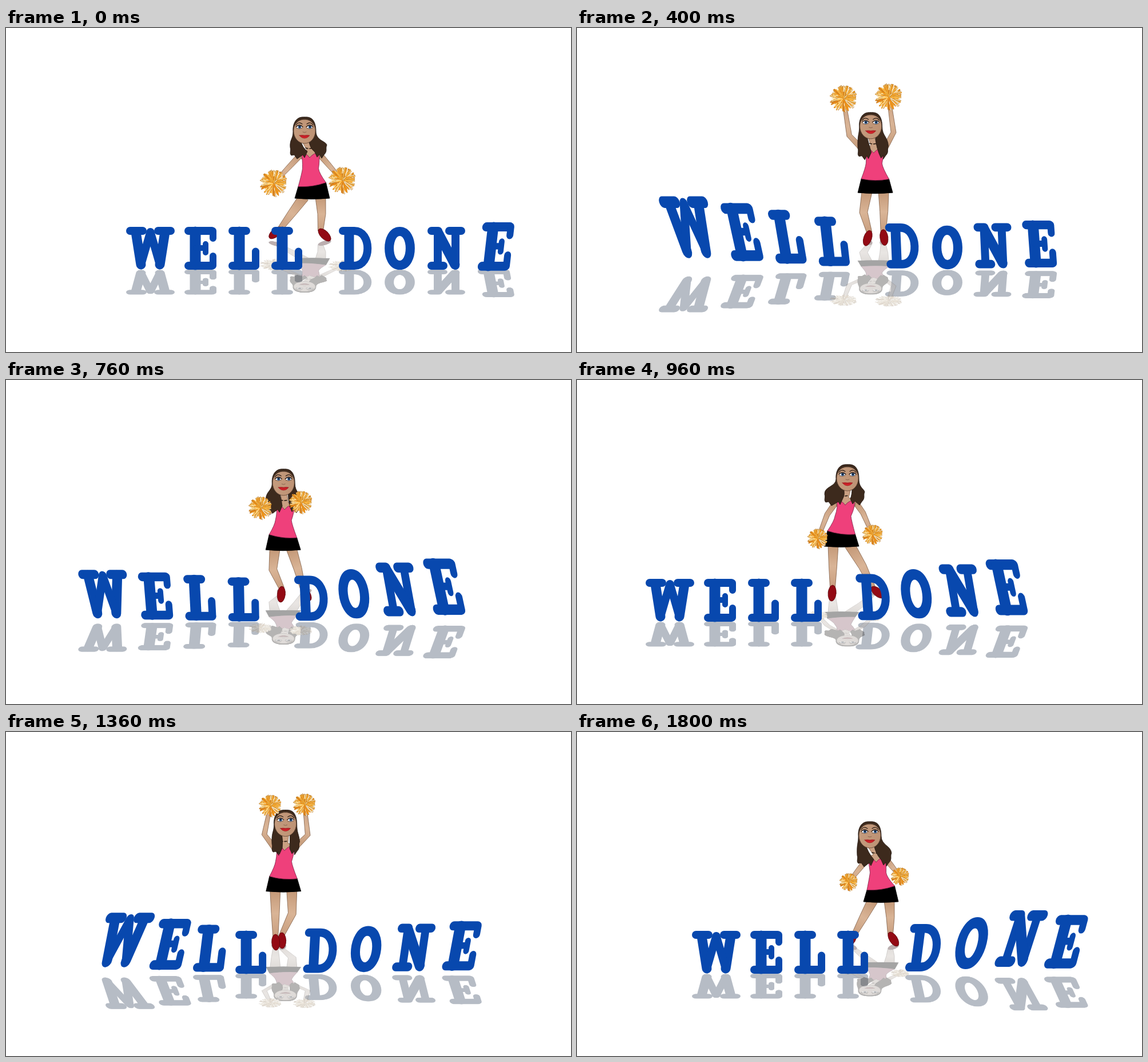
Animation, 988 px wide and 567 px high, one loop 1840 ms. Source, as an HTML page with a canvas:

```html
<!DOCTYPE html>
<html lang="en">
<head>
<meta charset="utf-8">
<title>Well done</title>
<style>
html, body { margin: 0; width: 100%; height: 100%; overflow: hidden; background: #fff; }
canvas { display: block; width: 100%; height: 100%; }
</style>
</head>
<body>
<canvas role="img" aria-label="WELL DONE"></canvas>
<script>
const W = 988, H = 567, STEP = 40, LOOP = 1840;
const BLUE = '#0848ae', INK = '#2a1c14', HAIR = '#3d2a1d';
const scale = window.devicePixelRatio || 1;

function setup(canvas) {
  canvas.width = W * scale;
  canvas.height = H * scale;
  return canvas.getContext('2d');
}
const stage = setup(document.querySelector('canvas'));
const dancerLayer = setup(document.createElement('canvas'));
const wordLayer = setup(document.createElement('canvas'));

// Each row starts with its step number.
// word: offset, calm letter, growth to the left, growth to the right, lean, pivot y
const WORD = [
  [0, 0, 6, 0, .13, 75, 409],
  [4, -22, 5, .1, 0, -50, 461],
  [13, -61, 4, .072, .105, -55, 461],
  [22, -90, 3, 0, .075, -70, 461],
  [24, -90, 3, .025, .05, 0, 461],
  [28, -81, 3, .083, 0, 100, 461],
  [36, -43, 3, .083, .083, 100, 461],
  [43, -9, 3, 0, .106, 100, 461]
];
// body: head x y, shoulder shift, hem x y, hem tilt, hair left, right, bottom
const BODY = [
  [0, 522, 181, 10, 535, 274, -7, -26, 39, 46],
  [4, 524, 166, 5, 531, 258, -3, -25, 31, 54],
  [13, 498, 183, 7, 505, 274, 4, -24, 32, 55],
  [22, 473, 173, -3, 462, 267, 6, -41, 30, 45],
  [28, 480, 158, -1, 477, 251, 3, -27, 26, 50],
  [36, 498, 169, 1, 495, 262, 4, -24, 26, 54],
  [43, 512, 182, 12, 531, 273, -7, -23, 38, 52]
];
// legs: left ankle x y, bend, shoe angle, then the same for the right
const LEGS = [
  [0, 479, 352, 0, -50, 550, 355, 2, 45],
  [4, 503, 353, -1, -30, 548, 352, 1, 10],
  [13, 509, 364, -15, -8, 521, 363, 1, 15],
  [22, 447, 363, 0, -5, 518, 365, 2, 50],
  [28, 463, 352, -1, 0, 494, 348, 9, 28],
  [36, 478, 364, 1, 0, 483, 363, 8, -15],
  [43, 485, 354, 0, -30, 548, 354, 1, 32]
];
// arms: left pompom x y, bend, right pompom x y, bend, pompom radius
const ARMS = [
  [0, 468, 272, 0, 588, 267, 0, 23],
  [4, 484, 226, 0, 572, 221, 0, 24],
  [8, 466, 124, 14, 545, 121, -14, 23],
  [13, 466, 165, 18, 518, 154, -15, 22],
  [22, 421, 278, -4, 517, 271, 3, 17],
  [28, 443, 187, 10, 514, 179, -28, 19],
  [31, 458, 133, 15, 523, 130, -18, 19],
  [36, 475, 147, 15, 517, 146, -16, 18],
  [43, 475, 263, 0, 565, 253, 0, 15]
];

// Smooth curve through the rows of a table
function sample(rows, n) {
  const last = rows.length - 1;
  let i = 0;
  while (i < last - 1 && rows[i + 1][0] <= n) i++;
  const a = rows[i], b = rows[i + 1];
  const before = rows[Math.max(0, i - 1)], after = rows[Math.min(last, i + 2)];
  const span = b[0] - a[0], u = (n - a[0]) / span;
  return a.slice(1).map((v, j) => {
    const c = j + 1;
    const ta = (b[c] - before[c]) / (b[0] - before[0]) * span;
    const tb = (after[c] - a[c]) / (after[0] - a[0]) * span;
    const d = b[c] - v;
    return v + u * (ta + u * (3 * d - 2 * ta - tb + u * (ta + tb - 2 * d)));
  });
}

// Letter strokes on a 75 high box: [width, path]
const E = [[14, 'M7 7H48M7 68H48'], [12, 'M50 7V20M50 68V51'], [19, 'M19 9V66'], [10, 'M20 37H36M37 30V45']];
const L = [[14, 'M7 7H31M7 68H47'], [13, 'M47.5 68V43'], [19, 'M19 9V66']];
const GLYPHS = {
  E, L,
  W: [[14, 'M7 7H29M56 7H78'], [17, 'M17 9L26 66M68 9L59 66'], [14, 'M26 66L42.5 9L59 66']],
  D: [[14, 'M7 7H27C58 7 58 68 27 68H7'], [17, 'M18 9V66']],
  O: [[16, 'M26.5 8C51 8 51 67 26.5 67C2 67 2 8 26.5 8Z']],
  N: [[14, 'M7 7H19M7 68H28M38 7H59M18 8V68M49 8V68'], [17, 'M18 9L48 66']]
};
for (const key in GLYPHS) GLYPHS[key] = GLYPHS[key].map(([w, d]) => [w, new Path2D(d)]);
const LETTERS = [...'WELLDONE'];
const LEFTS = [210, 312, 389, 464, 582, 662, 737, 824];

function drawWord(c, n) {
  const [offset, calm, growLeft, growRight, lean, pivot] = sample(WORD, n);
  clear(c);
  c.lineCap = c.lineJoin = 'round';
  c.strokeStyle = BLUE;
  LETTERS.forEach((letter, i) => {
    const right = Math.max(0, i - calm) * growRight;
    const grow = Math.max(0, calm - i) * growLeft + Math.min(right, .67 - right);
    const s = 1 + grow, shift = lean * grow;
    c.save();
    c.transform(1, 0, -shift / 75, s, LEFTS[i] + offset + shift, pivot + (348 - pivot) * s);
    for (const [width, path] of GLYPHS[letter]) {
      c.lineWidth = width;
      c.stroke(path);
    }
    c.restore();
  });
}

let seed = 7;
const random = () => (seed = seed * 16807 % 2147483647) / 2147483647;
const TINTS = ['#f9a01f', '#ffc14d', '#ffe3a0', '#e98a1a', '#ffb233', '#fff3d2'];
const STRANDS = Array.from({ length: 150 }, (_, i) => ({
  angle: random() * 6.283, from: random() * .6, to: .72 + random() * .3,
  curl: (random() - .5) * .6, tint: TINTS[i % TINTS.length]
}));

function clear(c) {
  c.setTransform(scale, 0, 0, scale, 0, 0);
  c.clearRect(0, 0, W, H);
}

function shape(c, d, fill, line, width = .8) {
  const path = new Path2D(d);
  if (fill) { c.fillStyle = fill; c.fill(path); }
  if (line) { c.strokeStyle = line; c.lineWidth = width; c.stroke(path); }
}

function oval(c, x, y, rx, ry, fill, line, turn = 0) {
  c.beginPath();
  c.ellipse(x, y, rx, ry, turn, 0, 7);
  c.fillStyle = fill;
  c.fill();
  if (line) { c.strokeStyle = line; c.lineWidth = .8; c.stroke(); }
}

// Tapered limb with one joint pushed sideways by bend
function limb(c, x1, y1, x2, y2, bend, at, widths) {
  const dx = x2 - x1, dy = y2 - y1, len = Math.hypot(dx, dy) || 1;
  const jx = x1 + dx * at + dy / len * bend, jy = y1 + dy * at - dx / len * bend;
  const points = [[x1, y1], [jx, jy], [x2, y2]];
  const side = sign => points.map(([x, y], i) => {
    const [px, py] = points[Math.max(0, i - 1)], [qx, qy] = points[Math.min(2, i + 1)];
    const l = Math.hypot(qx - px, qy - py) || 1, r = sign * widths[i] / 2;
    return `${x + (qy - py) / l * r} ${y - (qx - px) / l * r}`;
  });
  const skin = c.createLinearGradient(x1, y1, x2, y2);
  skin.addColorStop(0, '#c39877');
  skin.addColorStop(.5, '#d9b496');
  skin.addColorStop(1, '#c99f80');
  shape(c, 'M' + [...side(1), ...side(-1).reverse()].join('L') + 'Z', skin, '#80604a');
}

function drawShoe(c, x, y, degrees) {
  const a = degrees * Math.PI / 180;
  oval(c, x + 10 * Math.sin(a), y + 10 * Math.cos(a), 7, 14, '#930a14', '#5c060c', -a);
}

function drawPompom(c, x, y, r) {
  oval(c, x, y, r * .76, r * .76, '#fbae35');
  for (const { angle, from, to, curl, tint } of STRANDS) {
    const at = (d, turn) => `${x + Math.cos(angle + turn) * r * d} ${y + Math.sin(angle + turn) * r * d}`;
    const d = `M${at(from, 0)}Q${at((from + to) / 2, curl)} ${at(to, curl / 2)}`;
    if (to > .9) shape(c, d, null, '#a9691f', 2.1);
    shape(c, d, null, tint, 1.5);
  }
}

function drawHair(c, x, y, shift, left, right, bottom) {
  const inL = shift - 10, inR = shift + 8;
  c.save();
  c.translate(x, y);
  shape(c, `M0 -25C-15 -27 -21 -13 -20 0C-20 14 ${left} 13 ${left + 1} ${bottom - 18}
    C${left + 3} ${bottom - 12} ${left - 1} ${bottom - 8} ${left + 3} ${bottom - 4}
    L${left + 8} ${bottom - 5}L${left + 13} ${bottom + 2}L${inL - 3} ${bottom - 5}L${inL} ${bottom}
    L${inL + 5} ${bottom - 11}Q-4 28 -7 15L8 15Q8 28 ${inR} ${bottom - 10}
    L${inR + 4} ${bottom - 1}L${inR + 8} ${bottom - 6}L${right - 9} ${bottom + 1}L${right - 5} ${bottom - 5}
    C${right + 2} ${bottom - 12} ${right - 3} ${bottom - 16} ${right} ${bottom - 22}
    C${right - 1} 17 20 16 20 0C20 -15 15 -27 0 -25Z`, HAIR, '#20150e');
  c.restore();
}

function drawFace(c, x, y) {
  c.save();
  c.translate(x, y);
  const skin = c.createLinearGradient(-19, 0, 19, 0);
  skin.addColorStop(0, '#c49b7d');
  skin.addColorStop(1, '#bd9274');
  shape(c, 'M0 -21C13 -21 19 -11 19 -1C19 12 10 21 0 21C-10 21 -19 12 -19 -1C-19 -11 -13 -21 0 -21Z', skin, '#5b4231');
  for (const ex of [-9, 9]) {
    oval(c, ex, -8, 5, 3.2, '#f1eff0');
    oval(c, ex + .5, -8, 2.7, 2.9, '#3868a4');
    oval(c, ex + .5, -8, 1.3, 1.4, '#111');
    shape(c, `M${ex - 6} -8Q${ex} -14 ${ex + 6} -8`, null, INK, 1.3);
    shape(c, `M${ex - 5} -5.5Q${ex} -3.5 ${ex + 5} -6`, null, INK, .6);
  }
  shape(c, 'M-15 -11Q-11 -18 -4 -13M4 -13Q11 -18 15 -11', null, INK, 1.2);
  shape(c, 'M-3 1Q0 3 3 1', null, '#80604a', .9);
  shape(c, 'M-9 7Q-4 6 0 7Q5 6 9 7Q5 12 0 12Q-5 12 -9 7Z', '#d7242b', '#8e151c', .6);
  shape(c, 'M-7 8Q0 9 7 8', null, '#8e151c', .6);
  c.restore();
}

function drawDancer(c, n) {
  const [x, y, shift, hemX, hemY, tilt, hairL, hairR, hairB] = sample(BODY, n);
  const [lx, ly, lBend, lShoe, rx, ry, rBend, rShoe] = sample(LEGS, n);
  const [px, py, pBend, qx, qy, qBend, radius] = sample(ARMS, n);
  const sx = x + shift, sy = y + 40;
  const wx = (sx + hemX) / 2 - 1, wy = sy + (hemY - sy) * .47;
  const hemL = `${hemX - 24} ${hemY - tilt / 2}`, hemR = `${hemX + 24.5} ${hemY + tilt / 2}`;
  clear(c);
  c.lineJoin = c.lineCap = 'round';

  limb(c, hemX + 15, hemY + 22, rx, ry, rBend, .5, [18, 14, 9]);
  drawShoe(c, rx, ry, rShoe);
  limb(c, hemX - 14, hemY + 22, lx, ly, lBend, .5, [18, 14, 9]);
  drawShoe(c, lx, ly, lShoe);
  limb(c, sx - 18, sy + 2, px, py, pBend, .35, [10, 9, 6]);
  limb(c, sx + 17, sy + 1, qx, qy, qBend, .35, [10, 9, 6]);

  shape(c, `M${hemL}L${hemX - 30} ${hemY + 24}Q${hemX} ${hemY + 27} ${hemX + 31} ${hemY + 24}L${hemR}Z`, '#000', '#000');
  shape(c, `M${x - 5} ${y + 16}L${x + 6} ${y + 16}L${sx + 5} ${sy - 7}L${sx + 18} ${sy - 3}L${sx + 16} ${sy + 8}
    H${sx - 16}L${sx - 18} ${sy - 3}L${sx - 6} ${sy - 7}Z`, '#c9a082', '#80604a');
  shape(c, `M${sx - 16} ${sy - 2}Q${sx - 7} ${sy - 3} ${sx - 1} ${sy + 6}Q${sx + 6} ${sy - 3} ${sx + 15} ${sy - 2}
    Q${sx + 17} ${sy + 8} ${wx + 14} ${wy}Q${wx + 15} ${wy + 8} ${hemR}
    Q${hemX} ${hemY + 5} ${hemL}Q${wx - 15} ${wy + 8} ${wx - 14} ${wy}Q${sx - 13} ${sy + 9} ${sx - 16} ${sy - 2}Z`,
    '#ef407b', '#792044');
  c.setLineDash([4, 3]);
  shape(c, `M${sx - 8} ${y + 29}Q${sx - 2} ${y + 31} ${sx + 5} ${y + 29}`, null, '#20150e', 1.5);
  c.setLineDash([]);

  drawHair(c, x, y, shift, hairL, hairR, hairB);
  drawFace(c, x, y);
  drawPompom(c, px, py, radius);
  drawPompom(c, qx, qy, radius);
}

function reflect(layer, floor, squash) {
  stage.save();
  stage.filter = 'saturate(25%) opacity(36%)';
  stage.transform(1, 0, 0, -squash, 0, floor * (1 + squash));
  stage.drawImage(layer.canvas, 0, 0, W, H);
  stage.restore();
}

let shown = -1;
function render(n) {
  drawDancer(dancerLayer, n);
  drawWord(wordLayer, n);
  clear(stage);
  stage.fillStyle = '#fff';
  stage.fillRect(0, 0, W, H);
  reflect(wordLayer, 423, .58);
  reflect(dancerLayer, 372, .42);
  stage.drawImage(dancerLayer.canvas, 0, 0, W, H);
  stage.drawImage(wordLayer.canvas, 0, 0, W, H);
}

const start = performance.now();
function tick() {
  const time = (performance.now() - start) % LOOP;
  const n = Math.max(0, Math.floor(time / STEP) - 2); // the first pose holds for three steps
  if (n !== shown) render(shown = n);
  requestAnimationFrame(tick);
}
tick();
</script>
</body>
</html>
```
